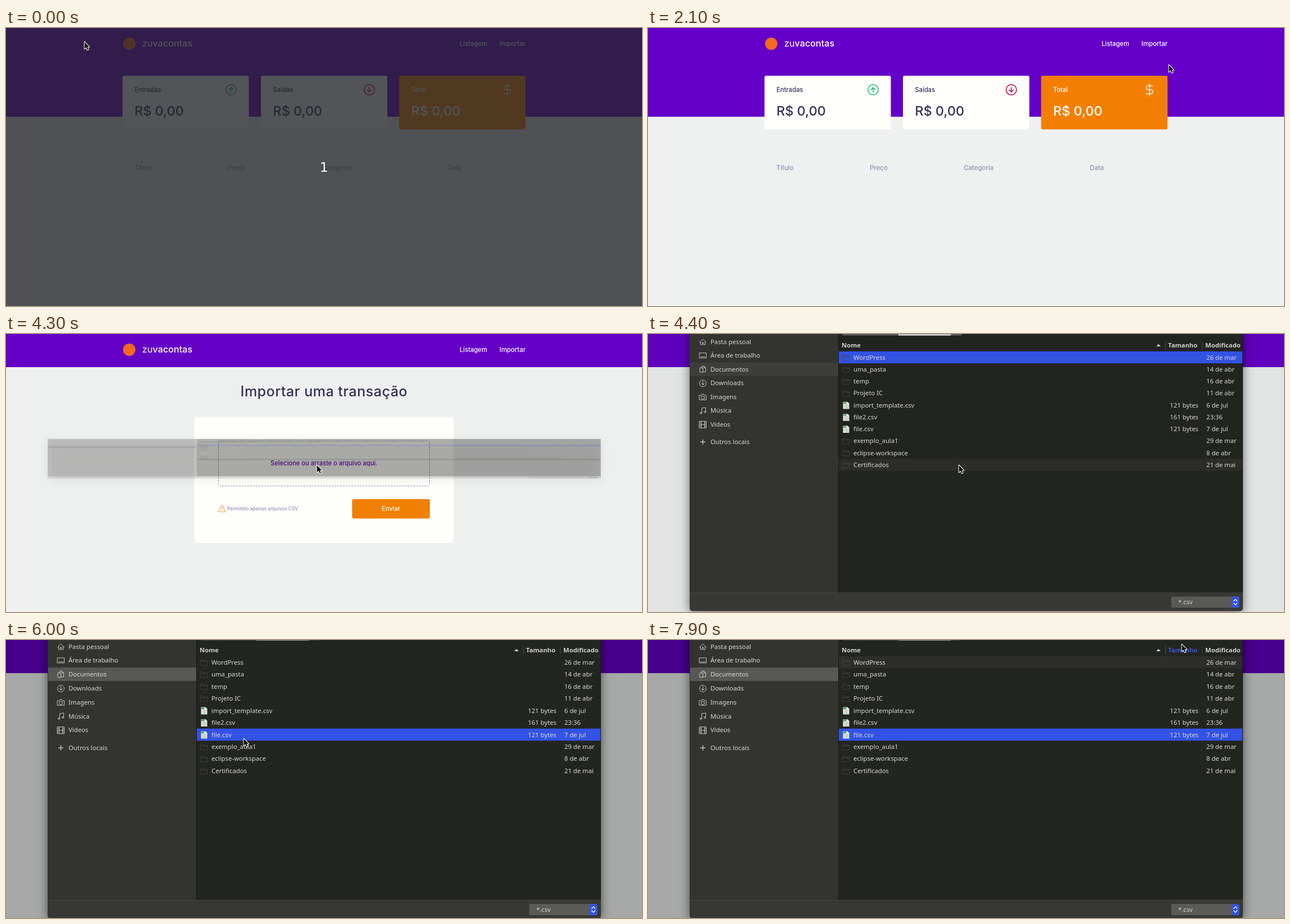
Recreate the animation shown at these times as an HTML page with a canvas. Size 1130 px wide and 495 px high, loop 8000 ms.

```html
<!DOCTYPE html>
<html lang="pt-BR">
<head>
<meta charset="utf-8">
<title>Finanças</title>
<style>
html, body { margin: 0; width: 100%; height: 100%; overflow: hidden; background: #eff0f0; }
canvas { display: block; width: 1130px; height: 495px; }
</style>
</head>
<body>
<canvas id="stage" width="1130" height="495"></canvas>
<script>
const ctx = document.getElementById('stage').getContext('2d');
const W = 1130, H = 495, LOOP = 8000, STEP = 100;
const PAGE_FONT = 'Inter, sans-serif';
const DIALOG_FONT = '"Noto Sans", "Open Sans", sans-serif';
const PURPLE = '#6500c8', ORANGE = '#f27f03', CARD = '#fffffc';
const INK = '#363158', MUTED = '#9390b0', BLUE = '#3353e4';

// Pointer path: time, x, y of the hotspot
const POINTER = [
  [700, 139, 24], [800, 165, 32], [1000, 300, 66], [1200, 430, 64], [1300, 454, 54],
  [1500, 454, 54], [1600, 500, 38], [1700, 552, 21], [1800, 552, 21], [1900, 680, 30],
  [2100, 925, 65], [2300, 915, 75], [2500, 906, 50], [2700, 902, 28], [3300, 902, 28],
  [3400, 880, 48], [3600, 680, 165], [3800, 556, 229], [3900, 556, 229], [4000, 552, 230],
  [4100, 552, 230], [4200, 552, 233], [4500, 552, 233], [4800, 490, 180], [5000, 428, 142],
  [5100, 410, 150], [5300, 348, 165], [5500, 422, 175], [6100, 422, 175], [6200, 440, 220],
  [6500, 650, 432], [6800, 960, 330], [7000, 1041, 122], [7300, 1036, 21], [7500, 1036, 21],
  [7700, 990, 14], [7900, 948, 7]
];
const FILES = [
  ['WordPress', '', '26 de mar'], ['uma_pasta', '', '14 de abr'], ['temp', '', '16 de abr'],
  ['Projeto IC', '', '11 de abr'], ['import_template.csv', '121 bytes', '6 de jul'],
  ['file2.csv', '161 bytes', '23:36'], ['file.csv', '121 bytes', '7 de jul'],
  ['exemplo_aula1', '', '29 de mar'], ['eclipse-workspace', '', '8 de abr'],
  ['Certificados', '', '21 de mai']
];
const PLACES = ['Pasta pessoal', 'Área de trabalho', 'Documentos', 'Downloads', 'Imagens', 'Música', 'Vídeos'];
const PLACE_ICONS = [
  'M-6 1L0-5 6 1M-4 0V5H-1V1H1V5H4V0',
  'M-6-5H6V4H-6ZM-4 2H-2M-1 2H1M2 2H4',
  'M-5-3H0V5H-5ZM-2-3V-6H2L5-3V4H0M2-6V-3H5',
  'M6 0A6 6 0 1 1-6 0A6 6 0 1 1 6 0M0-4V3M-3 0L0 3 3 0',
  'M-6-3H-3L-2-5H2L3-3H6V5H-6ZM3 1A3 3 0 1 1-3 1A3 3 0 1 1 3 1',
  'M-2 4V-5L5-6V2M-2 4A1.5 1.5 0 1 1-5 4A1.5 1.5 0 1 1-2 4M5 2A1.5 1.5 0 1 1 2 2A1.5 1.5 0 1 1 5 2',
  'M-6-6H6V6H-6ZM-3-6V6M3-6V6M-3 0H3M-6-3H-3M-6 0H-3M-6 3H-3M3-3H6M3 0H6M3 3H6'
];
const ROW_TOP = 29, ROW_H = 21.47;

const clamp = (v, a = 0, b = 1) => Math.min(b, Math.max(a, v));
const progress = (t, start, span) => clamp((t - start) / span);
const mix = (a, b, k) => a + (b - a) * k;

function rect(x, y, w, h, color, r = 0) {
  ctx.fillStyle = color;
  ctx.beginPath();
  ctx.roundRect(x, y, w, h, r);
  ctx.fill();
}

function text(s, x, y, size, color, { weight = 500, family = PAGE_FONT, align = 'left', spacing = 0 } = {}) {
  ctx.font = `${weight} ${size}px ${family}`;
  ctx.fillStyle = color;
  ctx.textAlign = align;
  ctx.letterSpacing = spacing + 'px';
  ctx.fillText(s, x, y);
}

function label(s, x, y, color = '#d9d9d5', options = {}) {
  text(s, x, y, 11.3, color, { weight: 400, family: DIALOG_FONT, ...options });
}

function shape(d, x, y, { fill, stroke, width = 1, scale = 1 }) {
  const path = new Path2D(d);
  ctx.save();
  ctx.translate(x, y);
  ctx.scale(scale, scale);
  ctx.lineWidth = width;
  ctx.lineCap = ctx.lineJoin = 'round';
  if (stroke) { ctx.strokeStyle = stroke; ctx.stroke(path); }
  if (fill) { ctx.fillStyle = fill; ctx.fill(path); }
  ctx.restore();
}

function header(height) {
  rect(0, 0, W, H, '#eff0f0');
  rect(0, 0, W, height, PURPLE);
  ctx.fillStyle = '#f26a22';
  ctx.beginPath();
  ctx.arc(219, 28, 11, 0, Math.PI * 2);
  ctx.fill();
  text('zu', 242, 33, 16.2, '#fff', { weight: 400 });
  text('vacontas', 242 + ctx.measureText('zu').width, 33, 16.2, '#fff');
  text('Listagem', 806, 32, 11.2, '#fff');
  text('Importar', 923, 32, 11.3, '#fff', { align: 'right' });
}

function arrowIcon(x, color, dir) {
  const ring = 'M9.2 0A9.2 9.2 0 1 1-9.2 0A9.2 9.2 0 1 1 9.2 0';
  const y = n => n * dir;
  shape(`${ring}M0 ${y(4)}V${y(-4)}M-3.8 ${y(-.2)}L0 ${y(-4)} 3.8 ${y(-.2)}`, x, 110, { stroke: color, width: 1.7 });
}

function listingPage() {
  header(158);
  [['Entradas', 207], ['Saídas', 453], ['Total', 698.5]].forEach(([name, x], i) => {
    const color = i === 2 ? '#fff' : INK;
    rect(x, 85, 224.5, 95.5, i === 2 ? ORANGE : CARD, 3);
    text(name, x + 21.3, 114, 11.2, color);
    text('R$ 0,00', x + 21.3, 156, 23.4, color);
  });
  arrowIcon(400, '#2dc47d', 1);
  arrowIcon(645.5, '#cc1158', -1);
  shape('M12 1V23M17 5H9.5a3.5 3.5 0 0 0 0 7h5a3.5 3.5 0 0 1 0 7H6', 879, 98, { stroke: '#fff', width: 1.4 });
  [['Título', 228], ['Preço', 394], ['Categoria', 561], ['Data', 785]]
    .forEach(([s, x]) => text(s, x, 253, 11.4, MUTED));
}

function importPage() {
  header(59);
  text('Importar uma transação', 565, 111, 25, INK, { align: 'center', spacing: 0.5 });
  rect(334.5, 148, 461, 224, CARD, 3);
  ctx.strokeStyle = MUTED;
  ctx.lineWidth = 1;
  ctx.setLineDash([3, 2]);
  ctx.beginPath();
  ctx.roundRect(377.5, 190.5, 375, 80, 3);
  ctx.stroke();
  ctx.setLineDash([]);
  text('Selecione ou arraste o arquivo aqui.', 565, 234, 11.1, '#6003b4', { align: 'center' });
  shape('M5.4.8L.4 9.5Q-.4 11.4 1.4 11.4H11.2Q13 11.4 12.2 9.5L7.2.8Q6.3-.4 5.4.8M6.3 4V7M6.3 9V9.1',
    377.3, 305.3, { stroke: '#eba03c', width: 1.1 });
  text('Permitido apenas arquivos CSV', 393, 314, 8.4, MUTED);
  rect(615, 294, 138, 34.5, ORANGE, 3);
  text('Enviar', 684, 315, 11.2, '#fff', { align: 'center' });
}

function statusBar() {
  rect(0, 475, 130, 20, '#000', [0, 3, 0, 0]);
  text('localhost:3000/import', 3, 490, 11.8, '#fff', { weight: 400, family: DIALOG_FONT });
}

function sidebar(t) {
  rect(74, -50, 264, 514, '#33342f');
  const shade = n => Math.round(mix(n, n + 26, progress(t, 4400, 200)));
  rect(75, 49, 263, 24, `rgb(${shade(61)},${shade(62)},${shade(58)})`);
  PLACES.forEach((name, i) => {
    const y = 11.5 + i * 24.8;
    shape(PLACE_ICONS[i], 97.5, y + 0.5, { stroke: '#c4c5c0' });
    label(name, 111, y + 4);
  });
  shape('M-4 0H4M0-4V4', 97.5, 192, { stroke: '#c4c5c0', width: 1.4 });
  label('Outros locais', 111, 196);
}

function fileIcon(y, isFile) {
  if (isFile) {
    shape('M0 0H8L11 3V13H0Z', 346.5, y - 6, { fill: '#e3e8df' });
    shape('M0 0H7L5 4H0Z', 346.5, y - 6, { fill: '#62a878' });
    shape('M3 6H9M3 8.5H9M3 11H9M6 5V12', 346.5, y - 6, { stroke: '#9cba9d', width: 0.7 });
  } else {
    shape('M0 0H4L5 2H12V10H0ZM0 3H12', 346, y - 4.5, { stroke: 'rgba(70,71,67,.75)' });
  }
}

function fileList(t, [px, py]) {
  const selected = t < 5800 ? 0 : 6;
  const hovered = Math.max(0, Math.floor((py - ROW_TOP) / ROW_H));
  const isOver = px > 339 && t >= 4300;
  const overHeader = isOver && py >= 5 && py < ROW_TOP;
  const bold = { weight: 700 };
  rect(338, -50, 719, 514, '#191a17');
  rect(339, -50, 717, 514, '#232520');
  rect(345, -20, 213, 20.6, '#5b5c58', 3);
  rect(445, -20, 93, 20.8, '#c3c4c0');
  label('Nome', 344, 22, '#cfd0cb', bold);
  label('Tamanho', 924, 22, overHeader && px > 919 && px < 985 ? '#3b58e8' : '#cfd0cb', bold);
  label('Modificado', 990, 22, overHeader && px >= 985 ? '#3b58e8' : '#cfd0cb', bold);
  shape('M-4 2L0-2 4 2Z', 907, 18, { fill: '#cfd0cb' });
  rect(919, 11, 1, 14, '#474843');
  rect(984.5, 11, 1, 14, '#474843');
  FILES.forEach(([name, size, date], i) => {
    const top = ROW_TOP + i * ROW_H, y = top + ROW_H / 2;
    if (i === selected) rect(339, top, 717, ROW_H, BLUE);
    else if (isOver && i === hovered) rect(339, top, 717, ROW_H, '#2d2e2a');
    fileIcon(y, size);
    label(name, 365, y + 4);
    label(size, 978, y + 4, '#d9d9d5', { align: 'right' });
    label(date, 992, y + 4);
  });
}

function dialog(t, pointer) {
  const p = progress(t, 4292, 120);
  const open = 1 - (1 - p) ** 2;
  if (!open) return;
  ctx.save();
  ctx.globalAlpha = open;
  ctx.translate(0, 222 * (1 - open));
  ctx.scale(1, open);
  ctx.shadowColor = 'rgba(0,0,0,.55)';
  ctx.shadowBlur = 18;
  ctx.shadowOffsetY = 3;
  rect(74, -52, 983, 548, '#373833', 5);
  ctx.shadowColor = 'transparent';
  sidebar(t);
  fileList(t, pointer);
  rect(74, 463, 983, 1, '#484944');
  rect(929.5, 470, 121, 20, '#5a5b57', 3);
  rect(1037, 470, 13.5, 20, BLUE, [0, 3, 3, 0]);
  shape('M-3-2L0-5 3-2M-3 2L0 5 3 2', 1043.7, 480, { stroke: '#fff', width: 1.3 });
  label('*.csv', 942, 484);
  ctx.restore();
}

function pointerAt(t) {
  const next = POINTER.findIndex(k => k[0] >= t);
  if (next <= 0) return POINTER[next < 0 ? POINTER.length - 1 : 0].slice(1);
  const [t0, x0, y0] = POINTER[next - 1], [t1, x1, y1] = POINTER[next];
  const k = (t - t0) / (t1 - t0);
  return [mix(x0, x1, k), mix(y0, y1, k)];
}

function drawPointer(t, [x, y]) {
  const onLink = t < 4200 && x > 875 && x < 924 && y > 18 && y < 38;
  const onDrop = t > 3400 && t < 4200 && x > 377 && x < 753 && y > 190;
  const look = { fill: '#111', stroke: '#fff', width: 2 };
  if (onLink || onDrop) {
    shape('M3 1.5c0-2 2.6-2 2.6 0v5l5.4 1.2c1.4.4 1.8 1.2 1.6 2.6l-.8 5.2H5L.3 10.4c-1-1.4.6-2.6 2-1.4l.8.8z',
      x - 4.3, y - 0.5, look);
    shape('M6 10V13M8 10V13M10 10V13', x - 4.3, y - 0.5, { stroke: '#fff', width: 0.7 });
  } else {
    shape('M0 0V12.5L2.9 9.8 5.1 14.2 7 13.3 4.9 9H8.6Z', x + 0.5, y + 0.8, look);
  }
}

function countdown() {
  rect(0, 0, W, H, 'rgba(35,37,42,.78)');
  text('1', 565, 256, 23.5, '#fff', { weight: 400, family: '"DejaVu Sans", sans-serif', align: 'center' });
}

function draw(t) {
  const pointer = pointerAt(t);
  if (t < 2900) listingPage(); else importPage();
  if (t >= 2800 && t < 3500) statusBar();
  if (t < 200) countdown();
  rect(0, 0, W, H, `rgba(0,0,0,${0.3 * progress(t, 4292, 600)})`);
  dialog(t, pointer);
  drawPointer(t, pointer);
}

const start = performance.now();
function tick() {
  const t = (performance.now() - start) % LOOP;
  draw(Math.floor(t / STEP) * STEP);
  requestAnimationFrame(tick);
}
tick();
</script>
</body>
</html>
```
